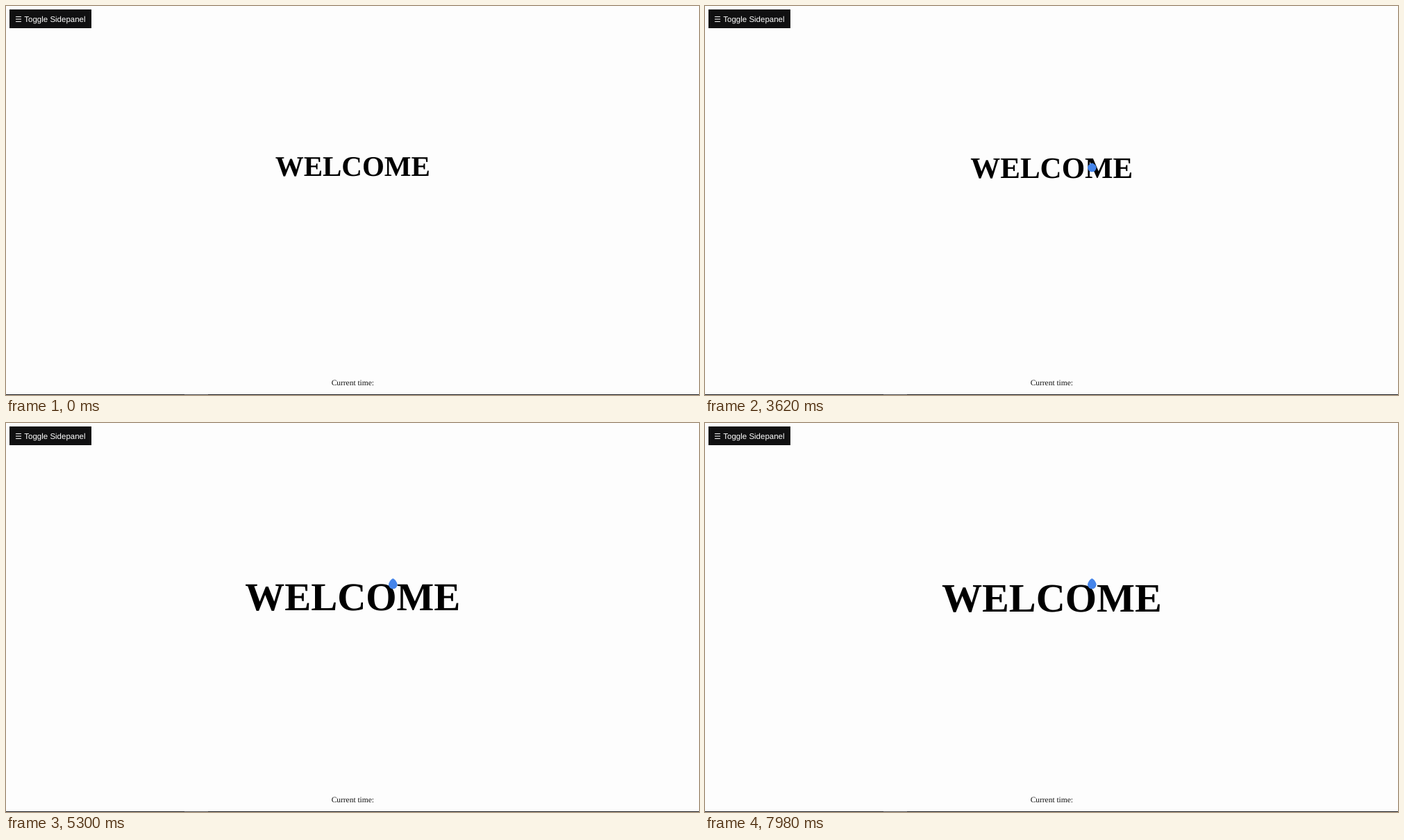
Animation, 998 px wide and 561 px high, one loop 8 s. Source, as an HTML page:

```html
<!DOCTYPE html>
<html lang="en">
<head>
<meta charset="utf-8">
<title>Welcome</title>
<style>
  html, body { margin: 0; width: 100%; height: 100%; overflow: hidden; background: #fdfdfd; }
  svg { display: block; width: 998px; height: 561px; }
  text { text-rendering: geometricPrecision; }
  .serif { font-family: "Liberation Serif", "Times New Roman", serif; text-anchor: middle; }
  .sans { font-family: "Liberation Sans", Arial, sans-serif; }
</style>
</head>
<body>
<svg viewBox="0 0 998 561">
  <rect x="5" y="5" width="118" height="27" fill="#101011"/>
  <path d="M14 15.5h8M14 19h8M14 22.5h8" stroke="#fff"/>
  <text class="sans" x="26.3" y="23" font-size="11.5" fill="#fff">Toggle Sidepanel</text>
  <text class="serif" id="heading" x="499.3" font-weight="bold">WELCOME</text>
  <text class="serif" x="499.3" y="547" font-size="11.45" fill="#111">Current time:</text>
  <rect y="560" width="998" height="1" fill="#17171b"/>
  <rect x="257" y="560" width="34" height="1" fill="#48484c"/>
  <path id="cursor" fill="#4484ea"/>
</svg>
<script>
const LOOP = 8000;
const HOVER = 3285;
const GROW = 3000;
const heading = document.getElementById('heading');
const cursor = document.getElementById('cursor');

// time, x, y of the centre of the cursor's round part
const path = [
  [1560, 989, 396],
  [1700, 914.5, 392.3],
  [2400, 698, 347.5],
  [2920, 598, 289.5],
  [HOVER, 557.3, 233]
];

const clamp = v => Math.min(1, Math.max(0, v));
const progress = (t, start, length) => clamp((t - start) / length);
const mix = (a, b, p) => a + (b - a) * p;

// CSS "ease": cubic-bezier(.25, .1, .25, 1)
function ease(x) {
  const bezier = (a, b, u) => 3 * a * u * (1 - u) ** 2 + 3 * b * u * u * (1 - u) + u ** 3;
  let low = 0, high = 1;
  for (let i = 0; i < 24; i++) {
    const mid = (low + high) / 2;
    if (bezier(.25, .25, mid) < x) low = mid; else high = mid;
  }
  return bezier(.1, 1, low);
}

// Smooth curve through the path points
function position(t, axis) {
  const last = path.length - 1;
  if (t >= path[last][0]) return path[last][axis];
  const i = path.findIndex(p => p[0] > t) - 1;
  const slope = k => {
    const a = path[Math.max(0, k - 1)], b = path[Math.min(last, k + 1)];
    return (b[axis] - a[axis]) / (b[0] - a[0]);
  };
  const a = path[i], b = path[i + 1], span = b[0] - a[0], u = (t - a[0]) / span;
  return mix(a[axis], b[axis], u * u * (3 - 2 * u))
    + span * u * (1 - u) * ((1 - u) * slope(i) - u * slope(i + 1));
}

function drop(tip) {
  const r = 6.3, k = 3.5;
  return `M${-r} 0C${-r} ${-k} ${-k * .5} ${-tip} 0 ${-tip}S${r} ${-k} ${r} 0A${r} ${r} 0 0 1 ${-r} 0Z`;
}

function draw(t) {
  const size = mix(41, 58.2, ease(progress(t, HOVER, GROW)));
  heading.setAttribute('font-size', size);
  heading.setAttribute('y', 181.2 + 1.561 * size);

  cursor.style.display = t < path[0][0] ? 'none' : '';
  if (t < path[0][0]) return;
  const rounded = progress(t, HOVER, 200), pointed = progress(t, 4180, 300);
  const tip = mix(mix(10, 6.5, rounded), 8.8, pointed);
  cursor.setAttribute('d', drop(tip));
  cursor.setAttribute('transform',
    `translate(${position(t, 1)} ${position(t, 2)}) rotate(${mix(-25, 0, rounded)})`);
}

function frame() {
  draw(performance.now() % LOOP);
  requestAnimationFrame(frame);
}
frame();
</script>
</body>
</html>
```
